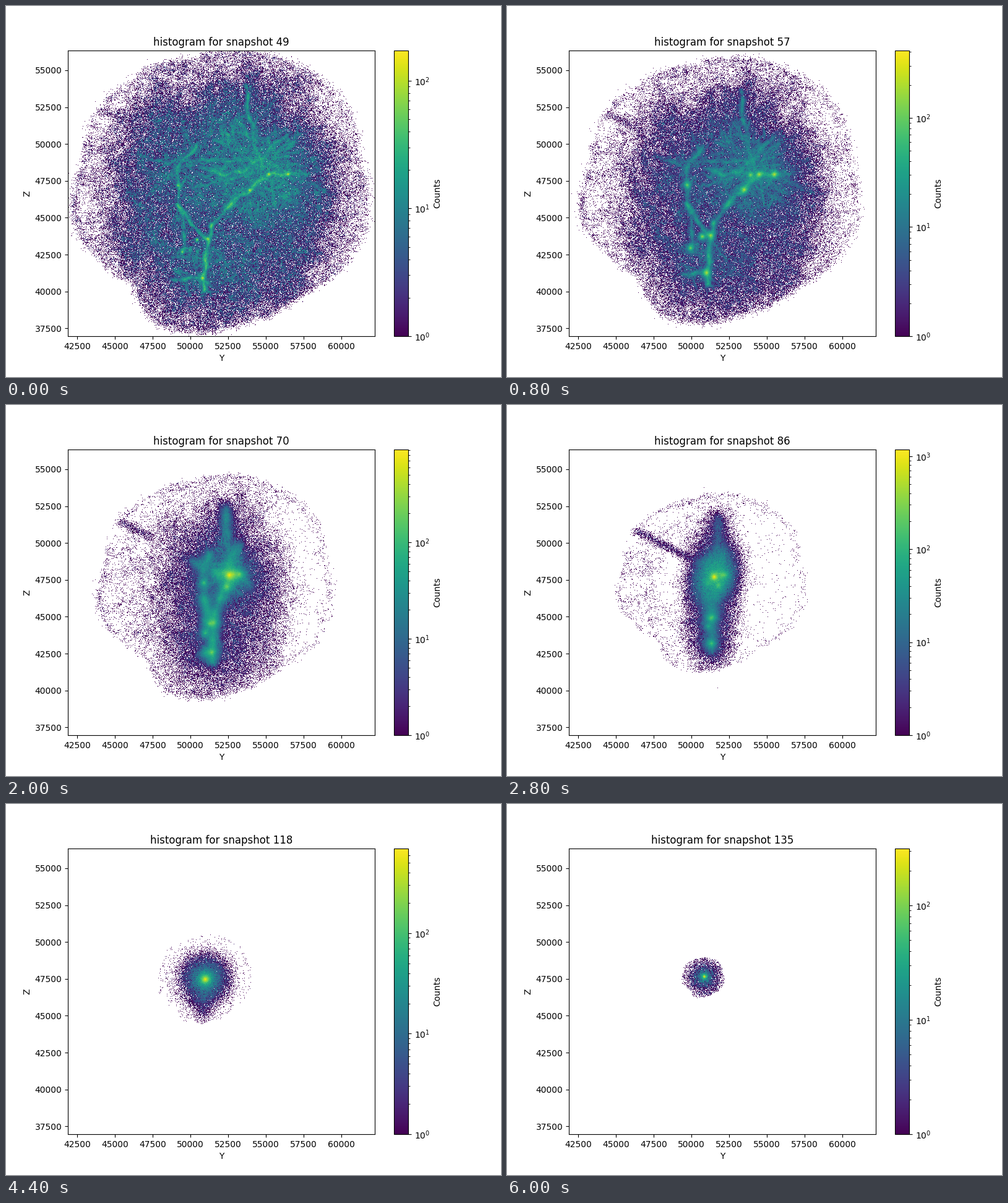
Animation of 800 by 600 pixels, one loop 6200 ms. Source, as a matplotlib script:

```python
import numpy as np
import matplotlib.pyplot as plt
from matplotlib.animation import FuncAnimation
from matplotlib.colors import LogNorm

FRAMES, STEP = 31, 200
W, H = 496, 462
LEFT, TOP = 100, 72
KEYS = [0, 6, 10, 14, 22, 30]
LABEL_KEYS = [0, 2, 6, 10, 14, 22, 30]
SNAP = [49, 53, 60, 70, 86, 118, 135]
LOG_MAX = [2.237, 2.466, 2.766, 2.962, 3.072, 2.843, 2.497]

rng = np.random.default_rng(7)
X, Y = np.meshgrid(LEFT + 0.5 + np.arange(W), TOP + 0.5 + np.arange(H))

# Corners of the outer shell: angle in degrees and radius.
CORNERS = [(-180, 246), (-165, 232), (-150, 248), (-100, 225), (-45, 252),
           (-15, 241), (5, 245), (30, 237), (50, 211), (75, 212),
           (115, 239), (135, 205), (150, 226), (165, 246)]

# Filaments at the start; flow() moves them. Each has a relative weight.
FILAMENTS = [
    (1.0, [(310, 222), (278, 262), (278, 318), (297, 350),
           (326, 378), (323, 415), (318, 440), (320, 465)]),
    (1.1, [(326, 378), (335, 352), (365, 318), (394, 298), (423, 272), (456, 272)]),
    (0.6, [(388, 128), (392, 170), (401, 218), (415, 265)]),
    (0.7, [(318, 262), (350, 272), (385, 268), (418, 240), (455, 205)]),
    (0.6, [(285, 398), (290, 365), (278, 320)]),
    (0.6, [(268, 442), (318, 440)]),
    (0.3, [(215, 240), (278, 262)]),
    (0.2, [(456, 272), (520, 300)])]

CLUMPS = [(394, 298, 1), (425, 272, 1), (456, 272, 1), (309, 378, 0.8),
          (326, 376, 0.7), (318, 440, 1), (278, 290, 0.5), (285, 398, 0.5)]


def key(i, *vals):
    return np.interp(i, KEYS, vals)


def peak(i):
    return 10 ** np.interp(i, LABEL_KEYS, LOG_MAX)


def shrink(i):
    return key(i, 1, .912, .797, .635, .315, .143)


def shell_mid(i):
    return np.array([key(i, 347, 344, 339, 332, 321, 317),
                     key(i, 302, 299, 295.5, 288.5, 284, 281)])


def flow(p, i):
    """Collapse of the inner matter, faster across than along."""
    mid = [key(i, 341, 341, 340, 334, 321, 318), 280]
    pull = [key(i, 1, .69, .32, .15, .08, .05), key(i, 1, .92, .75, .66, .34, .1)]
    return mid + (p - [341, 280]) * pull


def along(path, n):
    """Points on a gently winding polyline, partly gathered in knots."""
    path = np.array(path, float)
    last = len(path) - 1
    u = rng.uniform(0, last, n)
    held = rng.random(n) < 0.4
    knots = rng.uniform(0, last, 7 * last)
    u[held] = rng.choice(knots, held.sum()) + rng.normal(0, 0.05, held.sum())
    xy = [np.interp(u, np.arange(last + 1), path[:, k]) for k in (0, 1)]
    return np.stack([xy[0] + 2 * np.sin(5 * u), xy[1] + 2 * np.sin(7 * u)], 1)


def length(path):
    return np.hypot(*np.diff(path, axis=0).T).sum()


def wisps(x, y, radius, count, per=350):
    """Short faint threads in a disc."""
    turn = rng.uniform(0, 2 * np.pi, (count, 1))
    far = radius * np.sqrt(rng.random((count, 1)))
    lean = turn + rng.normal(0, 0.6, (count, 1))
    t = rng.uniform(-1, 1, (count, per)) * rng.uniform(8, 26, (count, 1))
    pts = np.stack([x + far * np.cos(turn) + t * np.cos(lean),
                    y + far * np.sin(turn) + t * np.sin(lean)], -1)
    return (pts + rng.normal(0, 1.4, pts.shape)).reshape(-1, 2)


STRANDS = np.concatenate([along(p, int(250 * w * length(p))) for w, p in FILAMENTS])
SPREAD = rng.normal(size=STRANDS.shape)
SPREAD *= np.exp(0.4 * rng.normal(size=(len(STRANDS), 1)))
STRAND_RANK = rng.random(len(STRANDS))

WISPS = np.concatenate([wisps(405, 262, 80, 125), wisps(300, 258, 45, 25),
                        wisps(315, 430, 45, 25)])
WISP_RANK = rng.random(len(WISPS))

ARM_U = rng.random((1900, 1))
ARM_OFF = rng.normal(0, 3.8, (1900, 2))


def cloud_noise(n=512):
    f = np.hypot(*np.meshgrid(np.fft.fftfreq(n), np.fft.fftfreq(n)))
    wave = np.fft.fft2(rng.normal(size=(n, n))) * (f + 0.01) ** -1.25
    wave[0, 0] = 0
    g = np.fft.ifft2(wave).real
    return g / g.std()


NOISE = cloud_noise()


def noise_at(i, shift=0):
    mid, k = shell_mid(i), max(shrink(i), 0.35)
    col = ((X - mid[0]) / k + shift).astype(int) % 512
    row = ((Y - mid[1]) / k + shift).astype(int) % 512
    return NOISE[row, col]


def shell(i):
    """Sparse outer shell, and the mask of everything inside it."""
    cx, cy = shell_mid(i)
    deg, rad = np.array(CORNERS).T
    th = np.arctan2(Y - cy, X - cx)
    edge = np.interp(th, np.radians(deg), rad, period=2 * np.pi) * shrink(i)
    q = np.hypot(X - cx, Y - cy) / edge + 0.01 * noise_at(i)
    rim = np.exp(-((q - 0.955) / 0.032) ** 2)
    west = np.clip(-np.cos(th + 0.15), 0, 1) ** 1.3
    fill = west * np.exp(-((q - 0.74) / 0.14) ** 2)
    patch = np.exp(0.8 * noise_at(i, 170) - 0.3)
    lam = (0.035 + 0.27 * rim + 0.33 * fill) * patch
    inside = 1 / (1 + np.exp(np.clip((q - 1) / 0.01, -50, 50)))
    return lam * key(i, 1, .75, .55, .42, .25, .1), inside


def body(i):
    """Dense ragged body."""
    dx = (X - key(i, 355, 357, 345, 331, 321, 318)) / key(i, 180, 143, 97, 42, 40, 29)
    dy = (Y - key(i, 315, 320, 315, 310, 283, 281)) / key(i, 203, 180, 150, 117, 40, 31)
    q = (abs(dx) ** 2.3 + abs(dy) ** 2.3) ** (1 / 2.3)
    q = np.clip(q + 0.06 * noise_at(i, 60), 0, 3)
    depth = key(i, 4.6, 3.4, 2.6, 2.6, 2.3, 2)
    return depth * np.exp(-1.5 * q ** key(i, 5, 4.5, 3.5, 3.5, 5, 4) + 0.35 * noise_at(i))


def centre(i):
    """Glow round the main mass, and its sharp core."""
    dx = X - key(i, 405, 388, 361, 335, 322, 319)
    dy = Y - key(i, 268, 276, 275, 278, 283.5, 279)
    c, s = np.cos(0.35), np.sin(0.35)
    minor = (dx * c + dy * s) / key(i, 85, 38, 17, 23, 14, 8)
    major = (dx * s - dy * c) / key(i, 70, 38, 17, 33, 14, 8)
    power = key(i, 2, 2, 1.3, 2.2, 1.3, 1.3)
    glow = key(i, 4, 7, 40, 42, 35, 20) * np.exp(-np.hypot(minor, major) ** power)
    core = peak(i) * key(i, 0, .5, .9, .9, .9, .95)
    size = key(i, 1.5, 3, 3, 2.5, 2.8, 1.3)
    return glow, core * np.exp(-np.hypot(dx, dy) / size)


def clumps(i):
    share = peak(i) * key(i, .75, .42, .2, .12, .005, 0)
    size = key(i, 1.3, 2.8, 3, 3, 6, 3)
    lam = np.zeros((H, W))
    for x0, y0, w in CLUMPS:
        x, y = flow(np.array([x0, y0]), i)
        lam += w * share * np.exp(-np.hypot(X - x, Y - y) / size)
    return lam


def particles(i):
    on = STRAND_RANK < key(i, .3, .45, 1, .35, 0, 0)
    strands = flow(STRANDS[on], i) + SPREAD[on] * key(i, 2, 3, 5.5, 7, 4, 4)
    on = WISP_RANK < key(i, 1, .7, .4, .1, 0, 0)
    threads = flow(WISPS[on], i)
    tip = shell_mid(i) + shrink(i) * np.array([-195, -135])
    n = int(1900 * key(i, .15, .3, .4, 1, 0, 0))
    arm = tip + ARM_U[:n] * key(i, 60, 56, 60, 120, 60, 0) * [.88, .45] + ARM_OFF[:n]

    xy = np.floor(np.concatenate([strands, threads, arm]) - [LEFT, TOP]).astype(int)
    ok = (xy >= 0).all(1) & (xy < [W, H]).all(1)
    cell = xy[ok, 1] * W + xy[ok, 0]
    return np.bincount(cell, minlength=W * H).reshape(H, W)


def counts(i):
    draw = np.random.default_rng(100 + i)
    sparse, inside = shell(i)
    glow, core = centre(i)
    lam = (sparse + body(i) + glow) * inside
    lam = lam * draw.gamma(5, 0.2, lam.shape) + (core + clumps(i)) * inside
    return np.ma.masked_less(draw.poisson(lam) + particles(i), 1)


fig, ax = plt.subplots(figsize=(8, 6), dpi=100)
im = ax.imshow(np.ma.masked_all((H, W)), norm=LogNorm(1, peak(0)),
               cmap="viridis", extent=(41868, 62234, 36965, 56340),
               origin="upper", aspect="auto", interpolation="nearest")
fig.colorbar(im, ax=ax, label="Counts")
ax.set_xlabel("Y")
ax.set_ylabel("Z")
title = ax.set_title("")


def update(i):
    im.set_data(counts(i))
    im.set_clim(1, peak(i))
    snap = int(np.interp(i, LABEL_KEYS, SNAP) + 0.5)
    title.set_text(f"histogram for snapshot {snap}")
    return im, title


anim = FuncAnimation(fig, update, frames=FRAMES, interval=STEP,
                     repeat=True, repeat_delay=0)
plt.show()
```
